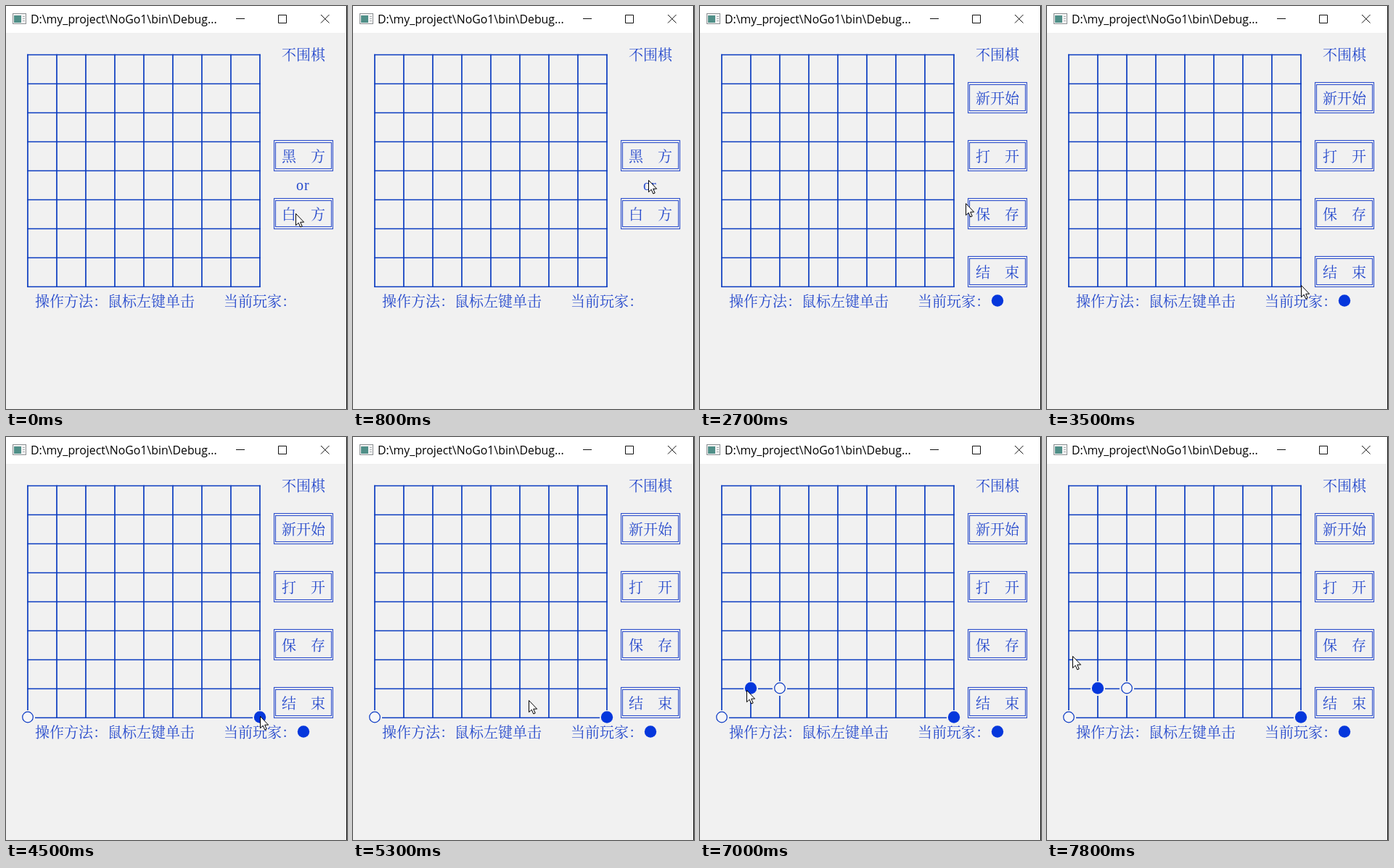
Recreate the animation shown at these times as an HTML page. Size 470x556 px, loop 8000 ms.

```html
<!DOCTYPE html>
<html lang="zh-CN">
<head>
<meta charset="utf-8">
<style>
  html, body { margin: 0; width: 100%; height: 100%; overflow: hidden; background: #f1f1f1; }
  svg { display: block; }
  .title { font: 15.85px "Open Sans", "Noto Sans", sans-serif; }
  .label { font: 300 20px "Noto Serif CJK SC", "Noto Sans CJK SC", "Noto Sans CJK", sans-serif; fill: #2448cc; }
  .or { font: 20px "Liberation Serif", serif; fill: #2448cc; }
  .box { fill: none; stroke: #2f50cc; stroke-width: 1.1; }
  .line { fill: #0c3cc0; }
  .blank { fill: #f1f1f1; }
  .disc { fill: #0537dc; }
  .ring { fill: #f6f6f8; stroke: #0a39c4; stroke-width: 1.2; }
</style>
</head>
<body>
<svg width="470" height="556" viewBox="0 0 470 556">
  <rect class="blank" width="470" height="556"/>
  <rect width="470" height="37" fill="#fff"/>
  <rect x="9.5" y="10.5" width="18" height="14" fill="#f4f4f4" stroke="#8b8f92"/>
  <rect x="11" y="13" width="10" height="10" fill="#508f88"/>
  <path d="M23 14.5h3M23 17.5h3M23 20.5h3" stroke="#a9adb0"/>
  <text class="title" x="34" y="24">D:\my_project\NoGo1\bin\Debug...</text>
  <path d="M317 17.5h12M375.5 12.5h11v11h-11zM434 12l11.5 11.5M445.5 12L434 23.5" fill="none" stroke="#111"/>
  <g id="board"></g>
  <g id="choice"></g>
  <g id="menu"></g>
  <g id="stones"></g>
  <path id="cursor" d="M.5 .5V16.7L4.2 13.2L6.8 19L9.2 18L6.7 12.2H11.6Z" fill="#fff" stroke="#000"/>
  <rect x="469" width="1" height="556" fill="#111"/>
</svg>
<script>
const LOOP = 8000, STEP = 100, CELL = 40, LEFT = 30, TOP = 67, SPAN = 8 * CELL;
const $ = id => document.getElementById(id);

const label = (x, mid, s) => `<text class="label" x="${x}" y="${mid + 7.6}">${s}</text>`;
const rect = (x, y, w, h, cls) => `<rect class="${cls}" x="${x}" y="${y}" width="${w}" height="${h}"/>`;
const button = (mid, s) => rect(369.5, mid - 21.5, 81, 42, 'box') +
  rect(371.5, mid - 18.5, 77, 36, 'box') + label(380, mid, s);
const circle = (x, y, cls) =>
  `<circle class="${cls}" cx="${x}" cy="${y - 0.5}" r="${cls === 'disc' ? 8.2 : 7.3}"/>`;

let board = '';
for (let d = 0; d <= SPAN; d += CELL) {
  board += rect(LEFT - 0.9 + d, TOP - 0.4, 1.7, SPAN + 1, 'line') +
    rect(LEFT - 0.9, TOP - 0.4 + d, SPAN + 1.7, 1.5, 'line');
}
$('board').innerHTML = board + label(380, 67, '不围棋') +
  label(40, 407, '操作方法：鼠标左键单击') + label(300, 407, '当前玩家：');
$('choice').innerHTML = button(207, '黑　方') + button(287, '白　方') +
  '<text class="or" x="400 411" y="254">or</text>';
$('menu').innerHTML = ['新开始', '打　开', '保　存', '结　束']
  .map((s, i) => button(127 + i * 80, s)).join('') + circle(410, 407, 'disc');

// the players alternate; each stone blanks its text cell
const stones = [
  { at: 3800, col: 8, row: 8 }, { at: 3900, col: 0, row: 8 },
  { at: 6400, col: 1, row: 7 }, { at: 6500, col: 2, row: 7 }
];
$('stones').innerHTML = stones.map(({ col, row }, i) => {
  const x = LEFT + col * CELL, y = TOP + row * CELL;
  return `<g>${rect(x - 10, y - 10, 20, 20, 'blank')}${circle(x, y, i % 2 ? 'ring' : 'disc')}</g>`;
}).join('');

const moves = [
  { from: 300, to: 1200, x: 413, y: 203 },
  { from: 2200, to: 2700, x: 366, y: 272 },
  { from: 2700, to: 3100, x: 344, y: 388 },
  { from: 3100, to: 3500, x: 350, y: 385 },
  { from: 4900, to: 5300, x: 242, y: 363 },
  { from: 5300, to: 6100, x: 64, y: 349 },
  { from: 7000, to: 7800, x: 35, y: 302 }
];
function pointer(t) {
  let x = 399, y = 286;
  for (const m of moves) {
    const k = Math.min(1, Math.max(0, (t - m.from) / (m.to - m.from)));
    x += (m.x - x) * k;
    y += (m.y - y) * k;
  }
  return [x, y].map(Math.round);
}

const show = (el, on) => el.style.display = on ? '' : 'none';
const start = performance.now();
function draw() {
  const now = (performance.now() - start) % LOOP;
  const t = Math.floor(now / STEP) * STEP;
  show($('choice'), t < 1600);
  show($('menu'), t >= 1600);
  stones.forEach(({ at }, i) => show($('stones').children[i], t >= at));
  $('cursor').setAttribute('transform', `translate(${pointer(t)})`);
  requestAnimationFrame(draw);
}
draw();
</script>
</body>
</html>
```
